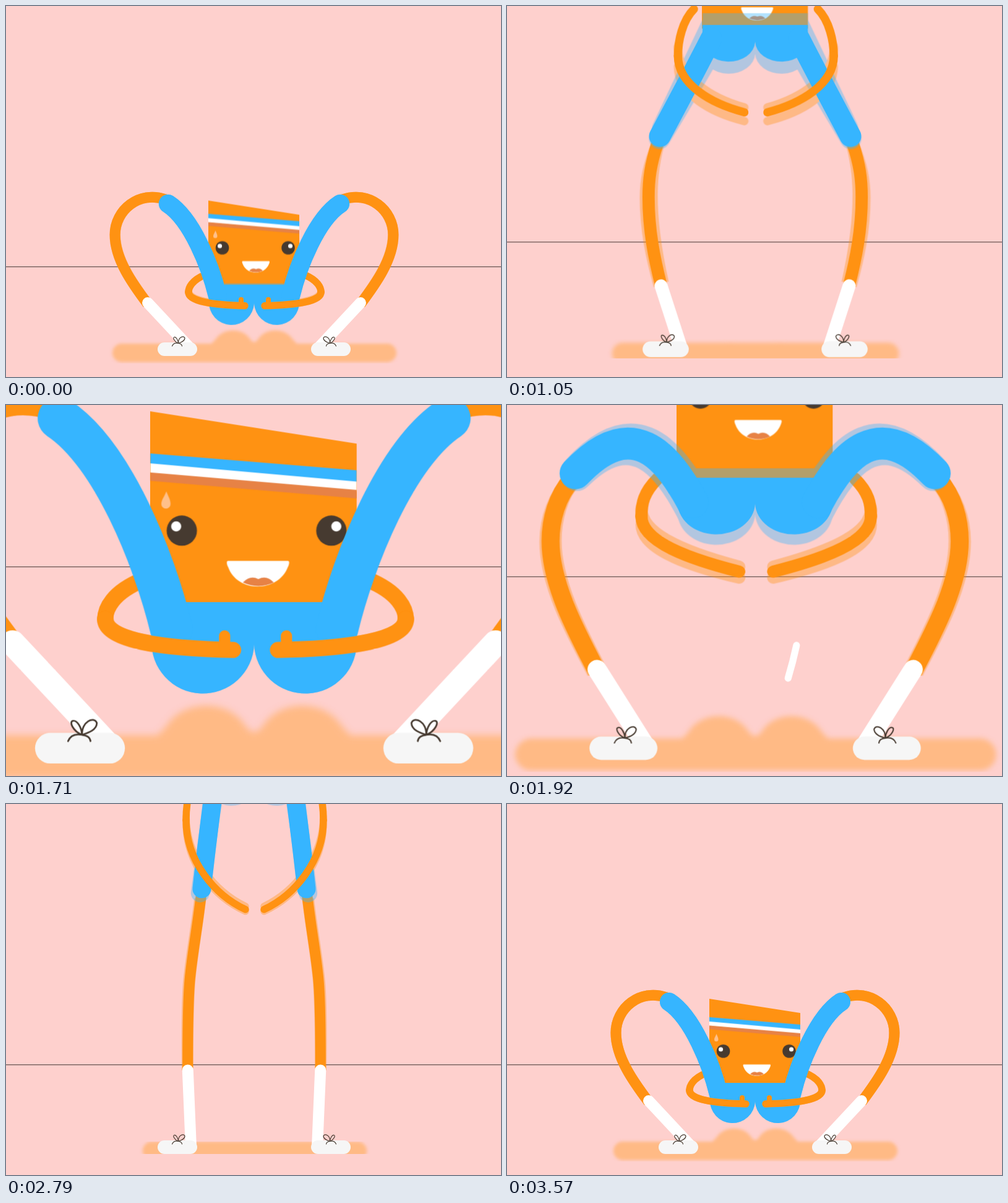
An HTML page without scripts that plays this animation: 800x600 px, repeating every 3.6 s.

```html
<!DOCTYPE html>
<html lang="en">
<head>
<meta charset="utf-8">
<title>Squats</title>
<style>
html, body { margin: 0; width: 100%; height: 100%; overflow: hidden; background: #fed0cd; }
svg { display: block; width: 800px; height: 600px; }

/* One squat. Each part supplies its own value for every pose. */
@keyframes pose {
  0%, 100% { d: var(--squat); animation-timing-function: cubic-bezier(.33,.1,.67,.5); }
  6.667% { d: var(--push); animation-timing-function: cubic-bezier(.33,.43,.67,.73); }
  18.333% { d: var(--rise); animation-timing-function: cubic-bezier(.33,.7,.67,1); }
  33.333% { d: var(--tall); animation-timing-function: cubic-bezier(.8,0,.9,.3); }
  55% { d: var(--dip); animation-timing-function: cubic-bezier(.33,.2,.67,.6); }
  58.333% { d: var(--fall); animation-timing-function: cubic-bezier(.33,.86,.67,.99); }
  73.333% { d: var(--land); animation-timing-function: ease-out; }
  83.333%, 98.333% { d: var(--squat); }
}
@keyframes shift {
  0%, 100% { transform: var(--load, var(--squat)); animation-timing-function: cubic-bezier(.33,.1,.67,.5); }
  6.667% { transform: var(--push); animation-timing-function: cubic-bezier(.33,.43,.67,.73); }
  18.333% { transform: var(--rise); animation-timing-function: cubic-bezier(.33,.7,.67,1); }
  33.333% { transform: var(--tall); animation-timing-function: cubic-bezier(.8,0,.9,.3); }
  55% { transform: var(--dip); animation-timing-function: cubic-bezier(.33,.2,.67,.6); }
  58.333% { transform: var(--fall); animation-timing-function: cubic-bezier(.33,.86,.67,.99); }
  73.333% { transform: var(--land); animation-timing-function: ease-out; }
  83.333%, 98.333% { transform: var(--squat); }
}
.leg, .sock, .upper, .arm, .thumb, .thigh, .pill {
  fill: none; stroke-linecap: round;
  animation: pose 1800ms linear var(--lag, 0s) infinite;
}
.body, .face, .seat, .bump { animation: shift 1800ms linear var(--lag, 0s) infinite; }

.leg {
  stroke: #ff9212; stroke-width: 17; stroke-linecap: butt;
  --squat: path("M258 313C215 298 176 330 176 370C176 410 205 450 229 482");
  --push: path("M228 302C214 318 208 340 208 360C208 400 232 445 252 483");
  --rise: path("M293 220C275 270 271 310 271 345C271 385 274 420 278 449");
  --tall: path("M321 90C318 150 310 200 304 260C299 320 297 380 297 422");
  --dip: path("M316 145C310 200 300 250 297 290C294 330 294 380 294 428");
  --fall: path("M266 268C256 300 254 320 254 344C254 390 262 430 271 466");
  --land: path("M258 311C215 296 176 328 176 369C176 409 205 450 229 481");
}
.sock {
  stroke: #fff; stroke-width: 18;
  --squat: path("M229 480L299 555");
  --push: path("M252 481L299 555");
  --rise: path("M280 453L299 555");
  --tall: path("M297 424L299 555");
  --dip: path("M294 430L299 555");
  --fall: path("M271 467L299 555");
  --land: path("M230 479L299 555");
}
.thigh {
  stroke: #36b5ff; stroke-width: 30;
  --squat: path("M342 470C330 420 300 345 262 320");
  --push: path("M342 325C318 280 285 240 231.500 296.500");
  --rise: path("M337 30C328 90 308 160 297 208");
  --tall: path("M340 -111C335 -50 328 20 322 80");
  --dip: path("M338 -41C333 0 324 70 317 136");
  --fall: path("M340 121C318 165 292 215 269 259");
  --land: path("M342 466C330 417 300 343 262 318");
}
.upper, .arm { stroke: #ff9212; stroke-width: 11.5; }
.upper {
  --squat: path("M322 435C300 444 295 456 295 463");
  --push: path("M309 303C296 316 294 326 294 338");
  --rise: path("M318 -10C296 30 291 70 291 100");
  --tall: path("M322 -150C302 -120 293 -80 293 -45");
  --dip: path("M322 -80C300 -50 291 -10 291 25");
  --fall: path("M316 80C300 96 294 125 294 145");
  --land: path("M322 431C300 440 295 452 295 459");
}
.arm {
  --squat: path("M295 463C295 478 335 484 386 485");
  --push: path("M294 338C294 362 340 378 386 389.500");
  --rise: path("M291 100C291 160 335 210 385 241");
  --tall: path("M293 -45C293 15 340 75 387 105");
  --dip: path("M291 25C291 92 338 147 387 170");
  --fall: path("M294 145C294 185 340 212 386 224");
  --land: path("M295 459C295 474 335 480 386 481");
}
.thumb {
  stroke: #ff9212; stroke-width: 8;
  --squat: path("M380 484V475");
  --push: path("M382 388V387");
  --rise: path("M382 239V238");
  --tall: path("M384 103V102");
  --dip: path("M384 168V167");
  --fall: path("M382 223V222");
  --land: path("M380 480V473");
}
.pill {
  stroke: #ffba85; stroke-width: 30;
  --squat: path("M187 561H616");
  --push: path("M190 561H613");
  --rise: path("M210 561H594");
  --tall: path("M249 561H554");
  --dip: path("M236 561H568");
  --fall: path("M218 561H585");
  --land: path("M187 561H616");
}
.bump {
  fill: #ffba85; transform-origin: 401px 561px;
  --squat: scaleY(1); --push: scaleY(1); --rise: scaleY(.5); --tall: scaleY(.3);
  --dip: scaleY(.3); --fall: scaleY(.4); --land: scaleY(1);
}
.body {
  --squat: translateY(0); --push: translateY(-149px); --rise: translateY(-439px);
  --tall: translateY(-581px); --dip: translateY(-511px); --fall: translateY(-349px);
  --land: translateY(-4.5px);
}
.face {
  --load: translateY(-8.5px); --squat: translateY(0); --push: translateY(-25px);
  --rise: translateY(-12px); --tall: translateY(0); --dip: translateY(3px);
  --fall: translateY(5px); --land: translateY(-.7px);
}
.seat {
  fill: #36b5ff; transform-origin: 401px 451px;
  --load: scaleY(1); --squat: scaleY(1); --push: scaleY(.82); --rise: scaleY(.82);
  --tall: scaleY(.85); --dip: scaleY(.8); --fall: scaleY(.78); --land: scaleY(.92);
}

/* Faint early and late copies soften fast moves. */
.trail { opacity: .38; }
.early { --lag: -5ms; }
.late { --lag: -1795ms; }

.foot { fill: none; stroke: #f6f6f6; stroke-width: 22; stroke-linecap: round; }
.lace { fill: none; stroke: #463a30; stroke-width: 1.2; stroke-linecap: round; }

.whoosh {
  fill: none; stroke: #fff; stroke-width: 6.5; stroke-linecap: round;
  animation: whoosh 1800ms linear infinite;
}
@keyframes whoosh {
  0%, 3.3% { stroke-dasharray: 0 300; stroke-dashoffset: 0; opacity: 0; }
  3.4% { stroke-dasharray: 0 300; opacity: 1; }
  6.667% { stroke-dasharray: 23 300; }
  18.333% { stroke-dasharray: 100 300; stroke-dashoffset: 0; }
  26.6% { stroke-dasharray: 100 300; stroke-dashoffset: -100; opacity: 1; }
  26.7%, 100% { stroke-dasharray: 100 300; stroke-dashoffset: -100; opacity: 0; }
}

.camera { transform-origin: 401px 555px; animation: zoom 3600ms linear infinite; }
@keyframes zoom {
  0% { transform: scale(1); }
  26.667% { transform: scale(1); animation-timing-function: cubic-bezier(.4,0,.8,.5); }
  29.167% { transform: scale(1.16); animation-timing-function: cubic-bezier(.33,.5,.67,1); }
  36.667% { transform: scale(2.26); }
  40% { transform: scale(2.27); }
  49.167% { transform: scale(2.27); animation-timing-function: cubic-bezier(.33,.1,.67,.5); }
  53.333% { transform: scale(1.72); animation-timing-function: cubic-bezier(.33,.45,.67,.95); }
  60.833% { transform: scale(1.05); animation-timing-function: ease-out; }
  66%, 100% { transform: scale(1); }
}
.horizon { fill: #75605d; animation: horizon 3600ms linear infinite; }
@keyframes horizon {
  0% { transform: translateY(0); }
  24.167% { transform: translateY(0); animation-timing-function: cubic-bezier(.33,0,.67,.5); }
  29.167% { transform: translateY(-39.5px); animation-timing-function: cubic-bezier(.33,.45,.67,1); }
  36.667%, 50.833% { transform: translateY(-160px); }
  50.833% { animation-timing-function: cubic-bezier(.33,0,.67,.4); }
  53.333% { transform: translateY(-144.5px); animation-timing-function: cubic-bezier(.33,.37,.67,1); }
  65%, 100% { transform: translateY(0); }
}
</style>
</head>
<body>
<svg viewBox="0 0 800 600">
  <defs>
    <filter id="soft" x="-10%" y="-30%" width="120%" height="160%"><feGaussianBlur stdDeviation="2.6"/></filter>
    <clipPath id="head"><path d="M327 315L474 338V456H327Z"/></clipPath>
    <path id="shorts" d="M328 451H474V478A36.500 36.500 0 0 1 401 481A36.500 36.500 0 0 1 328 478Z"/>
    <g id="shoe">
      <path class="foot" d="M256 555H298"/>
      <path class="lace" d="M278.500 545.500C272 543 269 536 272 535.500C275 535 278 540 278.500 545.500C278 536 287 532 289 537C289 542 283 544 278.500 545.500Q271 544 268.500 550M278.500 545.500Q284 546 284.500 550"/>
    </g>
  </defs>
  <rect width="800" height="600" fill="#fed0cd"/>
  <rect class="horizon" y="421" width="800" height="1.4"/>
  <g class="camera">
    <g filter="url(#soft)">
      <path class="pill"/>
      <path class="bump" d="M305 565Q326 553 338 540C350 520 382 520 394 538Q401 549 408 538C420 520 452 520 464 540Q476 553 497 565Z"/>
    </g>
    <path class="whoosh" pathLength="100" d="M432 489Q452.500 420 447.500 354"/>

    <g class="trail early"><path class="leg"/><g transform="matrix(-1 0 0 1 802 0)"><path class="leg"/></g></g>
    <g class="trail late"><path class="leg"/><g transform="matrix(-1 0 0 1 802 0)"><path class="leg"/></g></g>

    <g><path class="leg"/><path class="sock"/><use href="#shoe"/><path class="upper"/></g>
    <g transform="matrix(-1 0 0 1 802 0)"><path class="leg"/><path class="sock"/><use href="#shoe"/></g>
    <g transform="matrix(-1 0 0 1 804 0)"><path class="upper"/></g>

    <g class="body">
      <path fill="#ff9212" d="M327 315L474 338V456H327Z"/>
      <g clip-path="url(#head)">
        <g class="face">
          <path fill="#36b5ff" d="M327 345L474 357V366L327 353Z"/>
          <path fill="#fff" d="M327 352L474 365V372L327 359Z"/>
          <path fill="#e78245" d="M327 358.500L474 371V377L327 364.500Z"/>
          <path fill="#ffc08a" d="M338.500 372C340 376 341.500 378 341.500 381a3.300 3.300 0 0 1-6.600 0C335 378 337 376 338.500 372Z"/>
          <g fill="#463a30"><circle cx="349.500" cy="400" r="10.800"/><circle cx="456" cy="400" r="10.800"/></g>
          <g fill="#fff">
            <circle cx="345.500" cy="397" r="3.600"/><circle cx="459.500" cy="397" r="3.600"/>
            <path d="M382.500 421.500H425C426.500 421.500 426 424 425 426C418 444.500 389 444.500 382.500 426C381.500 424 381 421.500 382.500 421.500Z"/>
          </g>
          <path fill="#e78245" d="M393 437Q398 431.500 404 434.500Q410 431.500 415 437Q404 442 393 437Z"/>
        </g>
      </g>
    </g>

    <g class="trail early">
      <path class="thigh"/><path class="arm"/>
      <g transform="matrix(-1 0 0 1 802 0)"><path class="thigh"/></g>
      <g transform="matrix(-1 0 0 1 804 0)"><path class="arm"/></g>
      <g class="body"><g class="seat"><use href="#shorts"/></g></g>
    </g>
    <g class="trail late">
      <path class="thigh"/><path class="arm"/>
      <g transform="matrix(-1 0 0 1 802 0)"><path class="thigh"/></g>
      <g transform="matrix(-1 0 0 1 804 0)"><path class="arm"/></g>
      <g class="body"><g class="seat"><use href="#shorts"/></g></g>
    </g>

    <g class="body"><g class="seat"><use href="#shorts"/></g></g>
    <path class="thigh"/>
    <g transform="matrix(-1 0 0 1 802 0)"><path class="thigh"/></g>
    <g><path class="arm"/><path class="thumb"/></g>
    <g transform="matrix(-1 0 0 1 804 0)"><path class="arm"/><path class="thumb"/></g>
  </g>
</svg>
</body>
</html>
```
